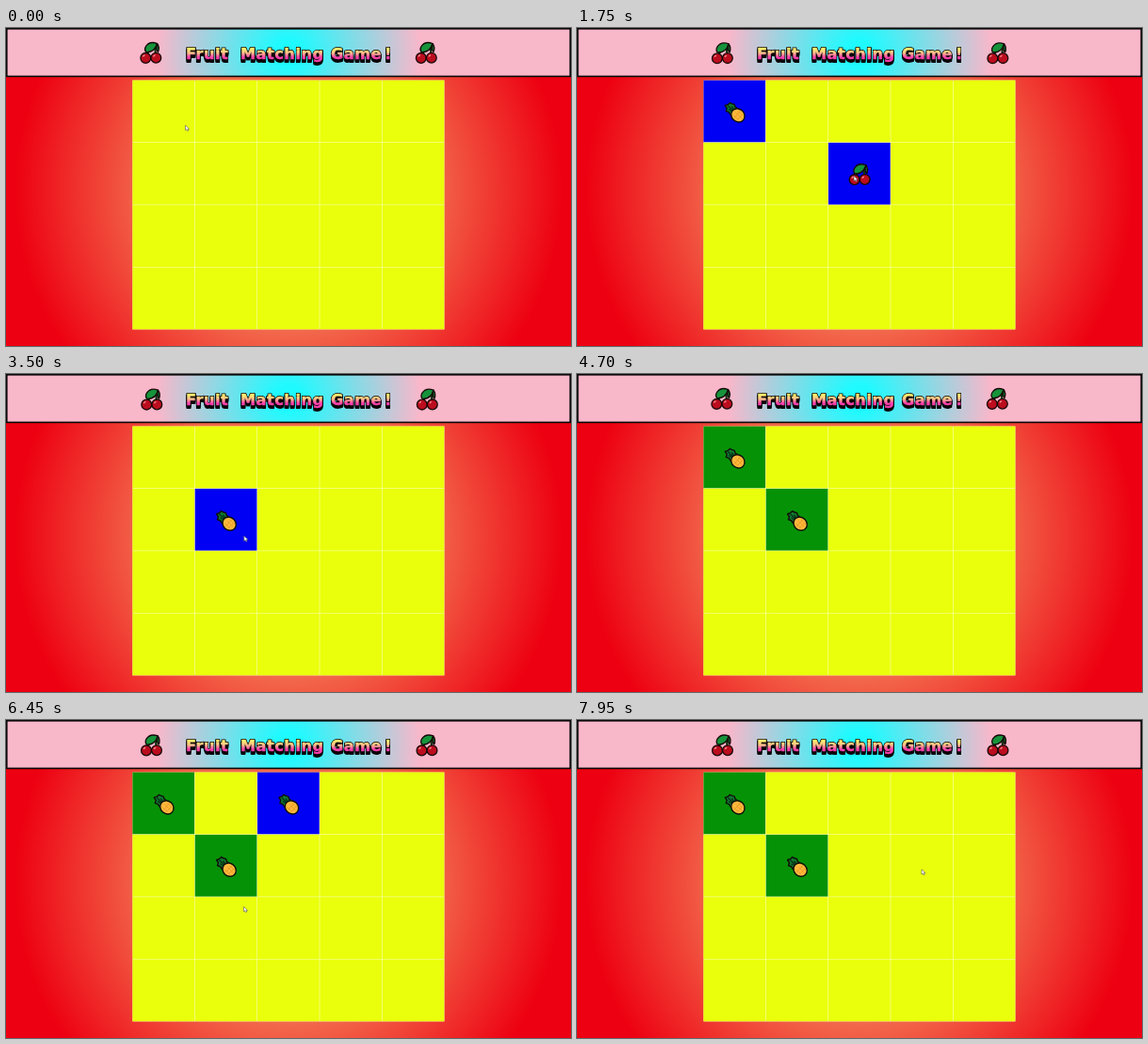
An HTML page that plays this animation: 600x338 px, repeating every 8 s.

```html
<!DOCTYPE html>
<html lang="en">
<head>
<meta charset="utf-8">
<title>Fruit Matching Game</title>
<style>
  html, body { margin: 0; width: 100%; height: 100%; overflow: hidden; }
  svg { display: block; width: 100vw; height: 100vh; }
  text { font: 700 16.2px "DejaVu Sans", sans-serif; letter-spacing: .5px; }
</style>
</head>
<body>
<svg viewBox="0 0 600 338" preserveAspectRatio="none">
  <defs>
    <radialGradient id="backdrop" gradientUnits="userSpaceOnUse" cx="300" cy="172" r="300">
      <stop offset=".5" stop-color="#f2694c"/>
      <stop offset=".97" stop-color="#ed0011"/>
    </radialGradient>
    <radialGradient id="banner" gradientUnits="userSpaceOnUse" cx="300" cy="26" r="140">
      <stop offset=".1" stop-color="#1ffaff"/>
      <stop offset="1" stop-color="#f9b7ca"/>
    </radialGradient>
    <linearGradient id="lettering" gradientUnits="userSpaceOnUse" x1="0" y1="19" x2="0" y2="34">
      <stop offset=".2" stop-color="#fff36a"/>
      <stop offset=".5" stop-color="#ffc08a"/>
      <stop offset=".8" stop-color="#ff3fae"/>
    </linearGradient>
    <g id="title">
      <text x="191" y="32.5">Fruit</text>
      <text x="249" y="32.5">Matching</text>
      <text x="345" y="32.5">Game</text>
      <text x="402" y="32.5">!</text>
    </g>
    <g id="cherries" stroke="#160808" stroke-width="1.3" stroke-linejoin="round">
      <path d="M-4 2Q-2-3 6-9Q4-3 6 2" fill="none" stroke="#0b3210" stroke-width="2.2"/>
      <path d="M7-10Q-1-13-5-7Q-7-4-5-1Q4 0 7-10Z" fill="#16933b"/>
      <path d="M7-10Q10-6 8-1Q5-4 7-10Z" fill="#0d702b"/>
      <circle cx="-5.2" cy="5.4" r="5.4" fill="#bb0d1e"/>
      <circle cx="5.8" cy="5.2" r="5.4" fill="#bb0d1e"/>
      <path d="M-8 4Q-7.5 2.5-6 2.5M3 4Q3.6 2.5 5 2.5" fill="none" stroke="#f58c92"/>
    </g>
    <g id="pineapple" stroke="#10100a" stroke-width="1.4" stroke-linejoin="round">
      <path d="M-1 0L-4 3L-6 0L-9-1L-8-4L-10-7L-7-8L-5-10L-3-9L0-8L1-5L3-4Z" fill="#127a2f"/>
      <path d="M-7-7L-2-2M-6-3L-3-1M-3-6L-1-3" stroke="#06351a"/>
      <ellipse cx="3.6" cy="3.4" rx="7.6" ry="6.7" transform="rotate(45 3.6 3.4)" fill="#fdb93c"/>
      <path d="M-1 3L4 8M1 0L8 7M4-1L9 4M0 6L6-1M3 8L9 2" fill="none" stroke="#dc8a1c" stroke-width=".6"/>
    </g>
  </defs>

  <rect width="600" height="338" fill="url(#backdrop)"/>
  <rect x=".8" y=".8" width="598.4" height="50.6" fill="url(#banner)" stroke="#080808" stroke-width="1.6"/>
  <g fill="#0b0508" stroke="#0b0508" stroke-width="1.8">
    <use href="#title" y="3"/><use href="#title" y="2"/><use href="#title" y="1"/><use href="#title"/>
  </g>
  <use href="#title" fill="url(#lettering)" stroke="url(#lettering)" stroke-width=".4"/>
  <use class="swinger" data-x="153.5" href="#cherries"/>
  <use class="swinger" data-x="446" href="#cherries"/>

  <rect x="134.4" y="55.6" width="331.1" height="264.8" fill="#f8ffb4"/>
  <g id="board"></g>
  <path id="cursor" d="M0 0V5.2L1.3 4.2L2.2 6L3.2 5.5L2.4 3.8H4Z" fill="#fff" stroke="#555" stroke-width=".6"/>
</svg>
<script>
const LOOP = 8000, SWAY = 2400, CELL = 66.3, FACE = 65.7;
const YELLOW = '#eaff0b', BLUE = '#0000f4', GREEN = '#069206';

// Each entry shows one card face: card index, fruit, start, end, colour.
const reveals = [
  [0, 'pineapple', 400, 2050, BLUE],
  [7, 'cherries', 1050, 2050, BLUE],
  [6, 'pineapple', 2650, 4350, BLUE],
  [0, 'pineapple', 4000, 4350, BLUE],
  [0, 'pineapple', 4350, LOOP, GREEN],
  [6, 'pineapple', 4350, LOOP, GREEN],
  [2, 'pineapple', 5500, 7550, BLUE],
  [11, 'cherries', 6550, 7550, BLUE],
];

// Cursor stops: time, x, y.
const stops = [
  [0, 190.5, 103.5], [400, 190.5, 103.5], [900, 303.7, 153.8], [1500, 303.7, 153.8],
  [2400, 252.8, 172.2], [3550, 252.8, 172.2], [3950, 185, 104], [4500, 185, 104],
  [5400, 300, 104], [5700, 300, 104], [6350, 252.5, 198.5], [6900, 252.5, 198.5],
  [7800, 366, 158.8], [LOOP, 366, 158.8],
];

const setAll = (node, attributes) => {
  for (const key in attributes) node.setAttribute(key, attributes[key]);
};
const svgNode = (tag, attributes, parent) => {
  const node = document.createElementNS('http://www.w3.org/2000/svg', tag);
  setAll(node, attributes);
  return parent.appendChild(node);
};

const board = document.getElementById('board');
const cursor = document.getElementById('cursor');
const swingers = document.querySelectorAll('.swinger');
const cards = Array.from({ length: 20 }, (_, i) => {
  const x = 134.4 + (i % 5) * CELL, y = 55.6 + Math.floor(i / 5) * CELL;
  return {
    face: svgNode('rect', { x, y, width: FACE, height: FACE }, board),
    fruit: svgNode('use', { x: x + FACE / 2, y: y + FACE / 2 + 1 }, board),
  };
});

function cursorAt(time) {
  const next = Math.max(1, stops.findIndex(stop => stop[0] > time));
  const [t0, x0, y0] = stops[next - 1], [t1, x1, y1] = stops[next];
  const p = (time - t0) / (t1 - t0), eased = p * p * (3 - 2 * p);
  return [x0 + (x1 - x0) * eased, y0 + (y1 - y0) * eased];
}

function draw(now) {
  const time = now % LOOP;
  cards.forEach(({ face, fruit }, i) => {
    const shown = reveals.find(([card, , start, end]) => card === i && time >= start && time < end);
    face.setAttribute('fill', shown ? shown[4] : YELLOW);
    fruit.setAttribute('href', shown ? '#' + shown[1] : '');
  });

  const sway = (1 - Math.cos(time / SWAY * 2 * Math.PI)) / 2;
  swingers.forEach(node => node.setAttribute('transform',
    `translate(${+node.dataset.x + sway} ${26.5 + sway * .7})`));

  setAll(cursor, {
    transform: `translate(${cursorAt(time)})`,
    visibility: time > 4550 && time < 4900 ? 'hidden' : 'visible',
  });
  requestAnimationFrame(draw);
}
requestAnimationFrame(draw);
</script>
</body>
</html>
```
